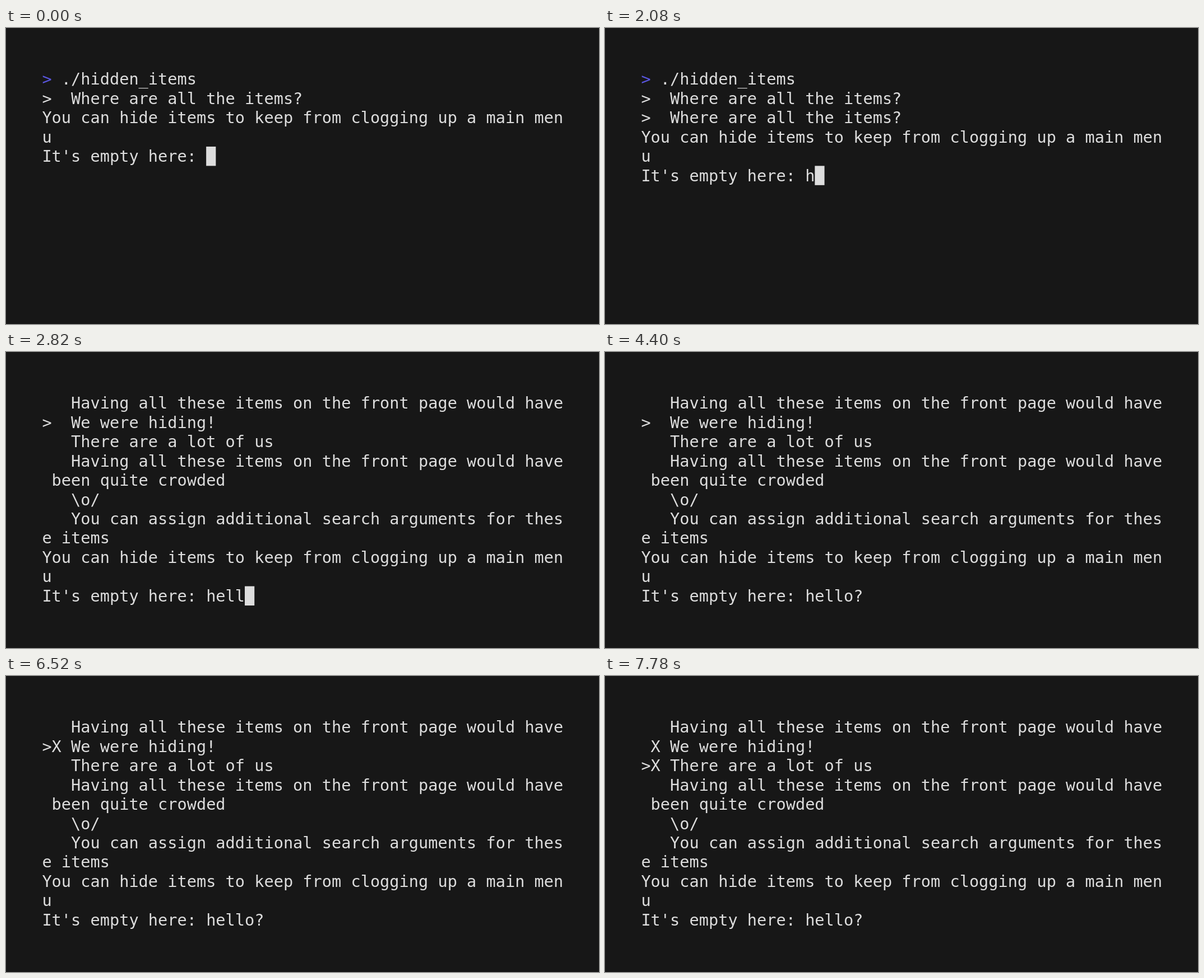
Recreate the animation shown at these times as an HTML page with a canvas. Size 1058 px wide and 529 px high, loop 8000 ms.

```html
<!DOCTYPE html>
<html lang="en">
<head>
<meta charset="utf-8">
<title>Hidden items</title>
<style>
  html, body { margin: 0; width: 100%; height: 100%; overflow: hidden; background: #171717; }
  canvas { display: block; width: 1058px; height: 529px; }
</style>
</head>
<body>
<canvas id="stage" width="1058" height="529"></canvas>
<script>
const ctx = document.getElementById('stage').getContext('2d');
const LOOP = 8000;
const LEFT = 64.4, TOP = 74.2, CELL_W = 17.22, CELL_H = 34.44, BASE = 27.1;
const BG = '#171717', FG = '#dddddd', PROMPT = '#5a56e0';

const COMMAND = '> ./hidden_items';
const WHERE = '>  Where are all the items?';
const LONG = '   Having all these items on the front page would have';
const TITLE = ['You can hide items to keep from clogging up a main men', 'u'];
const ASK = "It's empty here: ";

// Menu rows; pick is the selected item, marked counts the ticked ones.
function menu(pick, marked) {
  const item = (i, text) => (i === pick ? '>' : ' ') + (i < marked ? 'X ' : '  ') + text;
  return [
    item(0, 'We were hiding!'),
    item(1, 'There are a lot of us'),
    LONG,
    ' been quite crowded',
    '   \\o/',
    '   You can assign additional search arguments for thes',
    'e items'
  ];
}

const found = (head, pick = 0, marked = 0) => [head, ...menu(pick, marked), ...TITLE];
const start = [COMMAND, WHERE, ...TITLE];
const shifted = [COMMAND, WHERE, WHERE, ...TITLE];
const hello = found(LONG);
const ticked = found(LONG, 0, 1);
const moved = found(LONG, 1, 1);
const cleared = [...moved.slice(0, 8), '', ''];

// Each step: time, then whatever changes in the screen state.
const steps = [
  [0, { rows: start, query: '', cursor: true }],
  [380, { cursor: false }],
  [800, { cursor: true }],
  [1200, { cursor: false }],
  [1640, { cursor: true }],
  [2040, { query: 'h' }],
  [2080, { rows: shifted }],
  [2340, { query: 'he' }],
  [2360, { rows: found(WHERE), query: '' }],
  [2380, { query: 'he' }],
  [2580, { query: 'hel' }],
  [2600, { rows: hello }],
  [2820, { query: 'hell' }],
  [3060, { query: 'hello' }],
  [3300, { query: 'hello?' }],
  [3680, { cursor: false }],
  [4040, { cursor: true }],
  [4400, { cursor: false }],
  [4780, { cursor: true }],
  [5160, { cursor: false }],
  [5380, { rows: ticked }],
  [5400, { cursor: true }],
  [5780, { cursor: false }],
  [6140, { cursor: true }],
  [6520, { cursor: false }],
  [6840, { rows: cleared }],
  [6860, { rows: moved, cursor: true }],
  [7240, { cursor: false }],
  [7400, { rows: found(LONG, 1, 2), cursor: true }],
  [7780, { cursor: false }]
];

function stateAt(time) {
  const state = {};
  for (const [at, change] of steps) {
    if (at > time) break;
    Object.assign(state, change);
  }
  return state;
}

function drawRow(text, row) {
  const y = TOP + row * CELL_H + BASE;
  [...text].forEach((char, col) => {
    if (char === ' ') return;
    ctx.fillStyle = text === COMMAND && col === 0 ? PROMPT : FG;
    ctx.fillText(char, LEFT + col * CELL_W, y);
  });
}

function draw(time) {
  const { rows, query, cursor } = stateAt(time);
  const line = ASK + query;
  ctx.fillStyle = BG;
  ctx.fillRect(0, 0, 1058, 529);
  ctx.font = '28.6px "DejaVu Sans Mono", monospace';
  ctx.textBaseline = 'alphabetic';
  [...rows, line].forEach(drawRow);
  if (cursor) {
    ctx.fillStyle = FG;
    ctx.fillRect(LEFT + line.length * CELL_W, TOP + rows.length * CELL_H, CELL_W, CELL_H);
  }
}

const begin = performance.now();
function tick() {
  draw((performance.now() - begin) % LOOP);
  requestAnimationFrame(tick);
}
tick();
</script>
</body>
</html>
```
